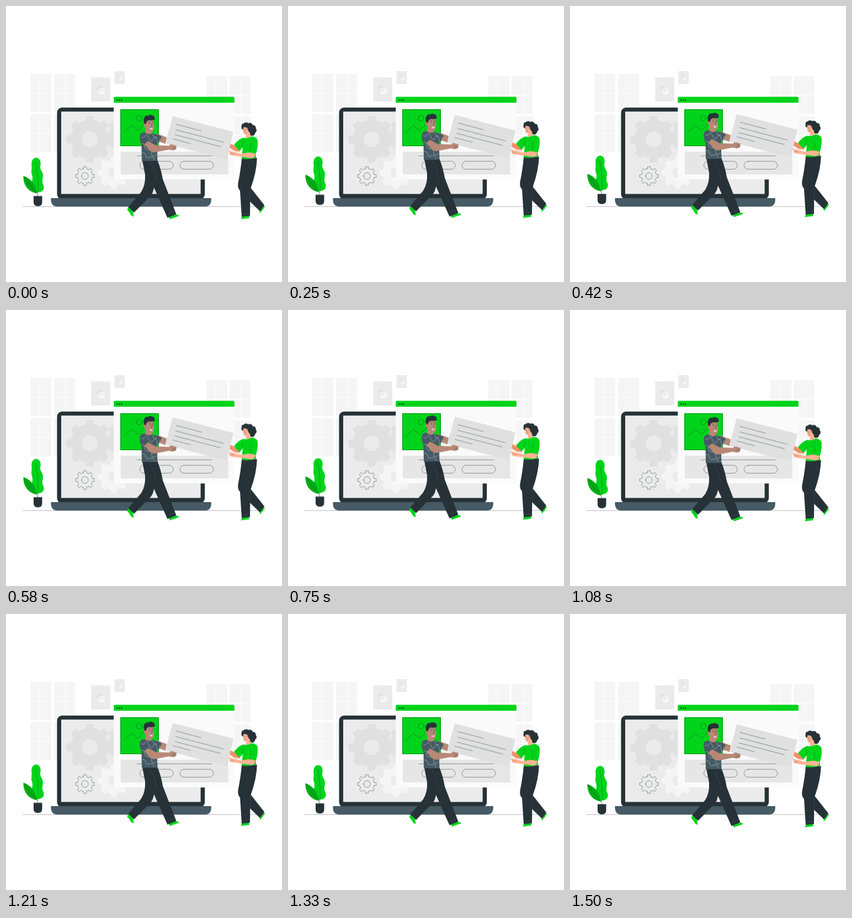
Animation, 500 px wide and 500 px high, one loop 1.54 s. Source, as an HTML page:

```html
<!DOCTYPE html>
<html lang="en">
<head>
<meta charset="utf-8">
<title>Building a page</title>
<style>
  html, body { margin: 0; width: 100%; height: 100%; overflow: hidden; background: #fff; }
  svg { display: block; width: 100%; height: 100%; }
  .float { animation: float 1540ms linear -40ms infinite; }
  @keyframes float { 50% { transform: translateY(-6.8px); } }
  .green { fill: #00d41a; }
  .leaf { fill: #00ab15; }
  .dark { fill: #263238; }
  .slate { fill: #455a64; }
  .tan { fill: #b78876; }
  .peach { fill: #ffb394; }
  .line { fill: none; stroke: #263238; stroke-width: .5; stroke-linecap: round; stroke-linejoin: round; }
  .thin { stroke-width: .35; }
  .wave { fill: none; stroke: #cfd8dc; stroke-width: .55; stroke-linecap: round; }
  .seam { fill: none; stroke: #455a64; stroke-width: .5; }
  .fold { fill: none; stroke: #00730f; stroke-width: .5; stroke-linecap: round; }
</style>
</head>
<body>
<svg viewBox="0 0 500 500" preserveAspectRatio="none">
  <defs>
    <g id="pane" fill="#f5f5f5">
      <path d="M0 0h16.700v33.700H0zM17.700 0H38v33.700H17.700zM0 34.800h16.700v33.700H0zM17.700 34.800H38v33.700H17.700z"/>
    </g>
    <g id="pane2" fill="#f5f5f5">
      <path d="M0 0h20.300v33.700H0zM21.300 0H38v33.700H21.300zM0 34.800h20.300v33.700H0zM21.300 34.800H38v33.700H21.300z"/>
    </g>
  </defs>

  <!-- wall -->
  <use href="#pane" x="44" y="123"/>
  <use href="#pane2" x="87" y="123"/>
  <use href="#pane" x="44" y="196"/>
  <use href="#pane2" x="87" y="196"/>
  <use href="#pane" x="363" y="127"/>
  <use href="#pane2" x="405" y="127"/>
  <use href="#pane2" x="405" y="200"/>
  <g fill="#ebebeb">
    <path d="M154.300 129.500h34.700v43.500h-34.700zM170 129.500q2.500-2 5 0zM196.500 118h18.500v23h-18.500z"/>
    <circle cx="173" cy="154" r="6.300" fill="#fafafa"/>
    <circle cx="169.500" cy="150" r="5.500" fill="#e0e0e0"/>
    <circle cx="171.500" cy="152.300" r="5" fill="#f0f0f0"/>
    <circle cx="206.500" cy="130.500" r="4" fill="#fafafa"/>
    <circle cx="205.300" cy="129.300" r="3.500" fill="#e0e0e0"/>
    <circle cx="206" cy="130" r="2.800" fill="#f0f0f0"/>
  </g>
  <path class="line thin" d="M30 363.400H470"/>

  <!-- laptop -->
  <rect class="dark" x="92.500" y="184" width="267.700" height="166" rx="9"/>
  <path fill="#ebebeb" d="M100 191.300H352.600V340.600H100z"/>
  <g id="gears"></g>
  <path class="slate" d="M81.500 348H371.800v4q-1 11.300-11 11.300H93q-10.500 0-11.500-11.300z"/>

  <!-- browser window -->
  <path fill="#fafafa" d="M195.200 174H413.800V314.300H195.200z"/>
  <path class="green" d="M195.200 175.200V166.500q0-2 2-2H411.800q2 0 2 2v8.700z"/>
  <g class="dark">
    <circle cx="201.300" cy="170.200" r="1.200"/>
    <circle cx="205.400" cy="170.200" r="1.200"/>
    <circle cx="209.500" cy="170.200" r="1.200"/>
  </g>
  <path class="leaf" d="M207 187h70v67h-70z"/>
  <path class="green" d="M208.700 188.700h66.600v63.600h-66.600z"/>
  <path class="line" d="M213 229l14.500-13 11 9.500 12.500-12.500 17 16"/>
  <circle class="line" cx="241.300" cy="203" r="5"/>
  <path fill="#e6e6e6" d="M208 264H402.700V305H208z"/>
  <path class="line" d="M237 271.500H372.500"/>
  <rect class="line" x="242.500" y="281.300" width="60.500" height="14.400" rx="7.200"/>
  <rect class="line" x="315.300" y="281.300" width="60.500" height="14.400" rx="7.200"/>

  <g class="float">
    <!-- plant -->
    <path class="green" d="M56 338C48 336 43 330 45 323C48 317 49 312 47 306C45 300 47 297 46.500 290C45 280 50 275 55 275C62 276 64 283 62 291C61 297 67 300 67 307C67 314 64 318 68 325C71 334 64 338 56 338z"/>
    <path class="leaf" d="M57 340C40 337 31 325 31.500 308C43 312 53 322 54.500 334z"/>
    <path class="line thin" d="M33 310Q43 326 56 340L58 346M54 283Q60 315 57.500 345"/>
    <path class="dark" d="M50 344.500H65.500V356q0 7-7.700 7T50 356z"/>

    <!-- rear arms -->
    <path class="tan" d="M272 231L291 238L289 250L272 244z"/>
    <path fill="#f28f6a" d="M404 248L419 256L424 264L414 263L403 256z"/>

    <!-- card -->
    <path fill="#e0e0e0" d="M302 200L412 228.300L400 278.500L288.500 249.500z"/>
    <path class="line" d="M308 214.500L354 226.700M307.500 224.500L394 247M306 233.500L388.500 255M302.500 241L334 249.500"/>

    <!-- man -->
    <path class="green" d="M222 363.500L219.500 369.500Q224 374 227 380L231.500 382L230 372.500zM294 381L297 386.500L314 380.500L311.500 378.500L305 378z"/>
    <path class="dark" d="M247 280H272L274 292Q266 304 268.500 324Q268 340 259 347L232 374.500L221.500 364.500L245 337Q253 324 252 306z"/>
    <path class="dark" d="M249 280H274.500Q281 296 284 314L308.500 377.500L292.500 384L267.500 328Q265 305 257 293z"/>
    <path class="seam" d="M261 284Q270 298 273 317M293 377L306 372"/>
    <path class="tan" d="M253 218L264 225L264.500 234Q257 239 252 231z"/>
    <path class="slate" d="M251 229Q257 235 264.500 231L276 233.500L282 237L278.500 246L273.500 250L274.500 281H246L245.500 252Q240.500 241 243 233Q245 229.500 251 229z"/>
    <path class="wave" d="M245 237q4 4 7-1t7 4 8 1 7 4 5-4M246 249q5 0 5 6t7 6 6 7 9 2M247 266q5-1 6 5t8 3 7 5M266 233q1 7 7 5"/>
    <path class="tan" d="M251 207Q253 203 267 205L268.500 217Q269 229 263 229Q255 229.500 253 221Q248.500 218 250 212z"/>
    <path class="dark" d="M251 214Q247.500 206 251 202Q253 198 258 199Q261 196.500 265 198.500Q270 199 269.500 206Q265 208.500 260 207Q254 208 253.500 214z"/>
    <path class="line" d="M258 210.500l3-.7M264.500 210l2.500.4M263.500 213l1.500 4.500-2.300.2"/>
    <circle class="dark" cx="260" cy="213" r=".7"/>
    <circle class="dark" cx="265.800" cy="213" r=".7"/>
    <path d="M260 221.500q3 1.600 6-.3-.8 3-3.200 2.800-2 0-2.800-2.500z" fill="#fff"/>
    <path class="tan" d="M250.500 251L257.500 245L271 252.500L295 253.500Q299 249.500 302 251.500L309 253.500Q310.500 255 307.500 255.700L309 257.500Q308 261 302 262L295 260.500L269 265.500Q264 265.500 260 262z"/>
    <path class="line thin" d="M302 256l6 .2M302 258.700l6-.3"/>

    <!-- woman -->
    <path class="green" d="M428 379.500L425.500 386.500L441 384.500L440 380zM460 369L459.500 376Q465 371 469 363.500L465 361z"/>
    <path class="dark" d="M434 277L454.800 275.500Q454 301 443.500 330L468 361L460 372L433 346z"/>
    <path class="dark" d="M427 276.500L449 277Q451 300 442.500 329L442 380.500L427 382L424 335Q419 330 420.500 321Q425.500 296 427 276.500z"/>
    <path class="seam" d="M443 331Q441 341 443 352M427 377L442 375.500M446 283Q448 289 452 289"/>
    <path class="dark" d="M430 213.500Q434 209.500 439 212.500Q445 210.500 447 216Q453 216 452.500 221.500Q456 226.500 451.500 230Q450 237 444 235Q438 236 437 231L429 224Q425 222.500 427 217.500Q426 213.500 430 213.500z"/>
    <path class="peach" d="M430 219.500Q435 216 440 219.500L441 227L443.500 237Q439 243 434.500 238L435 233.500Q429.500 233 429.500 226z"/>
    <path class="dark" d="M428 221Q426 216 431 214Q438 212 441 218Q446 222 442 229.500Q438.500 228 438 222Q433 218 428 221z"/>
    <circle class="dark" cx="431.800" cy="224.500" r=".6"/>
    <circle class="dark" cx="436.500" cy="224.500" r=".6"/>
    <path class="line thin" d="M433.700 225l-1.200 3 1.400.3M430.800 222.500l1.500-.4M435.500 222.300l2 .3M432.500 230.300q2 1 3.500-.6"/>
    <path class="green" d="M430 239Q439 241 444.500 236.500Q453.500 237 455.700 243Q456.500 257 452.500 267L453 275Q441 279 427 277L429 256L423 263L413 252Q423 240 430 239z"/>
    <path class="peach" d="M443 265L452 267Q452 276 444 276L424 273L415 272L407 270.500Q404 270 405.500 267.500L403.500 263.500Q404 261 409 264L417 265.500L425 268z"/>
    <path class="green" d="M441 243Q446 238 452 240Q456.500 243 455.700 251Q455 262 452.500 268L441 265.500Q446 255 441 243z"/>
    <path class="fold" d="M429 245l-1 10M443 250q2 8-2 15.500"/>
    <path class="line thin" d="M407 267l6 1.300"/>
  </g>
</svg>
<script>
  const NS = 'http://www.w3.org/2000/svg';

  function gearPath(cx, cy, outer, root, hole, teeth) {
    const step = 2 * Math.PI / teeth;
    const at = (r, a) => (cx + r * Math.sin(a)).toFixed(2) + ' ' + (cy - r * Math.cos(a)).toFixed(2);
    let d = '';
    for (let i = 0; i < teeth; i++) {
      const a = i * step;
      d += (i ? 'L' : 'M') + at(root, a - step * .27) + 'L' + at(outer, a - step * .18)
        + `A${outer} ${outer} 0 0 1 ` + at(outer, a + step * .18)
        + 'L' + at(root, a + step * .27)
        + `A${root} ${root} 0 0 1 ` + at(root, a + step * .73);
    }
    return d + `ZM${cx - hole} ${cy}a${hole} ${hole} 0 1 0 ${2 * hole} 0a${hole} ${hole} 0 1 0 ${-2 * hole} 0Z`;
  }

  function gear(shape, attrs) {
    const path = document.createElementNS(NS, 'path');
    path.setAttribute('d', gearPath(...shape));
    path.setAttribute('fill-rule', 'evenodd');
    for (const key in attrs) path.setAttribute(key, attrs[key]);
    document.getElementById('gears').append(path);
  }

  const solid = color => ({ fill: color, stroke: color, 'stroke-width': 1.5, 'stroke-linejoin': 'round' });
  gear([211, 234, 30, 24, 10, 8], solid('#e0e0e0'));
  gear([151.5, 241.5, 41.5, 34, 15, 8], solid('#e0e0e0'));
  gear([195, 302, 28.5, 23, 10.5, 8], solid('#f5f5f5'));
  gear([143, 308, 17, 13.5, 6, 8], { class: 'line' });
</script>
</body>
</html>
```
